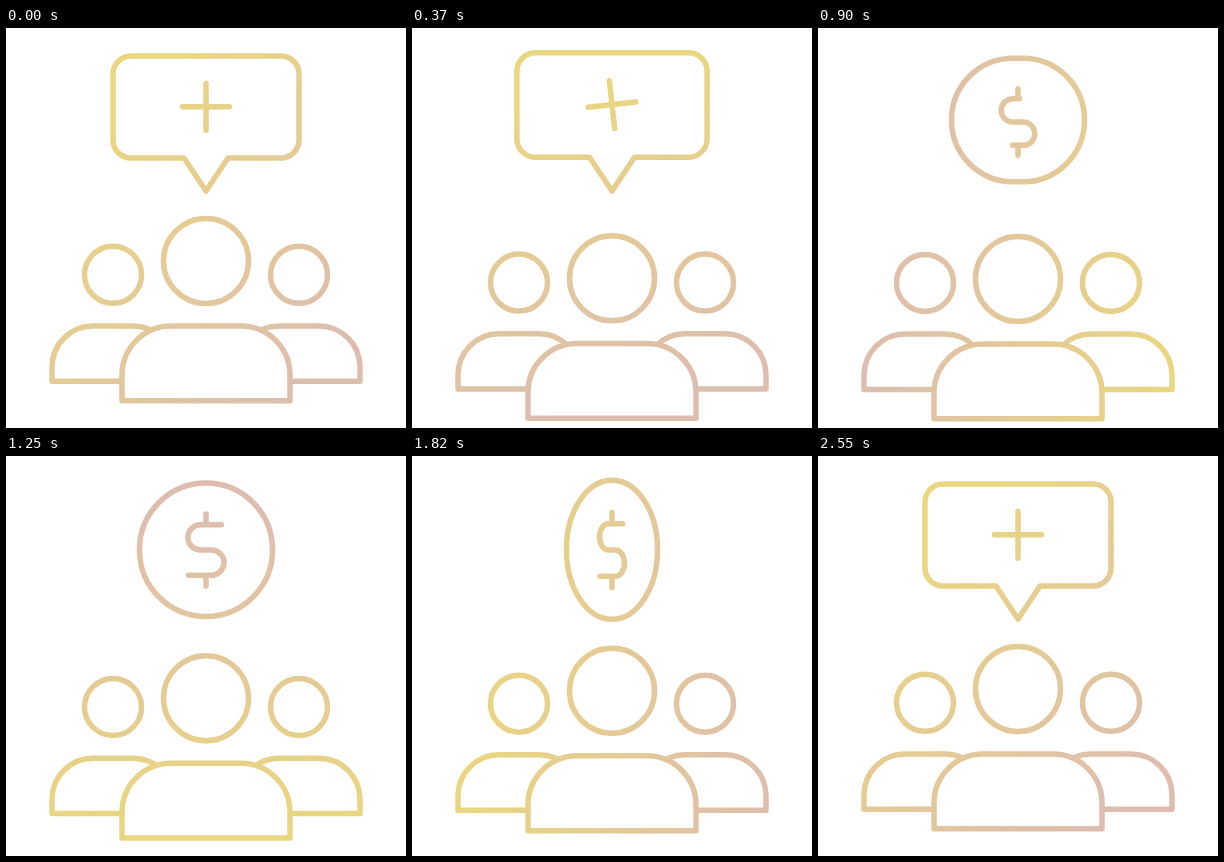
Write an HTML page with a canvas that moves like this. It is 400 px wide and 400 px high and loops after 2570 ms.

```html
<!DOCTYPE html>
<html lang="en">
<head>
<meta charset="utf-8">
<style>
html, body { margin: 0; width: 100%; height: 100%; overflow: hidden; background: #fff; }
canvas { display: block; width: 400px; height: 400px; }
</style>
</head>
<body>
<canvas id="stage"></canvas>
<script>
const LOOP = 2570, FLIP = 1960, CX = 200;
const GOLD = '#e9d680', PINK = '#ddbdb0';
const canvas = document.getElementById('stage');
const ctx = canvas.getContext('2d');
const dpr = window.devicePixelRatio || 1;
canvas.width = canvas.height = 400 * dpr;

const clamp = x => Math.min(1, Math.max(0, x));
const mix = (a, b, k) => a + (b - a) * k;
const span = (t, a, b) => clamp((t - a) / (b - a));
const smooth = x => x * x * (3 - 2 * x);

// Ease with control points (x1, 0) and (x2, 1), solved by bisection.
const bezier = (x1, x2) => x => {
  let lo = 0, hi = 1;
  for (let i = 0; i < 24; i++) {
    const u = (lo + hi) / 2, v = 1 - u;
    if (3 * u * v * v * x1 + 3 * u * u * v * x2 + u * u * u < x) lo = u; else hi = u;
  }
  return smooth(lo);
};
const settle = bezier(0.3, 0.2);
const turn = bezier(0.25, 0.5);
const windUp = t => span(t, 0, 600) ** 2.5;

// Half width, top, bottom, corner radius, tail size
const BUBBLE = [93, 28, 130, 18, 1];
const SWOLLEN = [100, 17.5, 127.5, 19.5, 1.08];
const SQUIRCLE = [66.5, 30.3, 153.7, 61.5, 0];
const COIN = [66.5, 27, 160.5, 66.5, 0];
const blend = (a, b, k) => a.map((v, i) => mix(v, b[i], k));

function signShape(t) {
  if (t >= FLIP) return BUBBLE;
  if (t < 600) return blend(BUBBLE, SWOLLEN, windUp(t));
  if (t < 900) return blend(SWOLLEN, SQUIRCLE, smooth(span(t, 600, 900)));
  return blend(SQUIRCLE, COIN, smooth(span(t, 900, 1100)));
}

function gradient(t) {
  const a = (-45 + 360 * turn(span(t, 40, 2530))) * Math.PI / 180;
  const x = 218, y = 210, dx = 155 * Math.sin(a), dy = -155 * Math.cos(a);
  const g = ctx.createLinearGradient(x + dx, y + dy, x - dx, y - dy);
  g.addColorStop(0, GOLD);
  g.addColorStop(1, PINK);
  return g;
}

// Builds a path under a transform, then strokes it with an even line width.
function draw(build, { x = 0, y = 0, sx = 1, sy = 1, rotate = 0, fill = false } = {}) {
  ctx.save();
  ctx.translate(x, y);
  ctx.scale(sx, sy);
  ctx.rotate(rotate);
  ctx.beginPath();
  build();
  ctx.restore();
  if (fill) ctx.fill();
  ctx.stroke();
}

function person(x, headY, headR, halfW, top, bottom, r, dy) {
  draw(() => {
    ctx.moveTo(-halfW, bottom);
    ctx.arcTo(-halfW, top, 0, top, r);
    ctx.arcTo(halfW, top, halfW, bottom, r);
    ctx.lineTo(halfW, bottom);
    ctx.closePath();
  }, { x, y: dy, fill: true });
  draw(() => ctx.arc(0, headY, headR, 0, 7), { x, y: dy });
}

function signPath([w, top, bottom, r, tail]) {
  const mid = (top + bottom) / 2;
  ctx.moveTo(0, top);
  ctx.arcTo(w, top, w, mid, r);
  ctx.arcTo(w, bottom, 0, bottom, r);
  if (tail > 0.01) {
    ctx.lineTo(22 * tail, bottom);
    ctx.lineTo(0, bottom + 33 * tail);
    ctx.lineTo(-22 * tail, bottom);
  }
  ctx.arcTo(-w, bottom, -w, mid, r);
  ctx.arcTo(-w, top, 0, top, r);
  ctx.closePath();
}

function plusPath() {
  ctx.moveTo(0, -23.5); ctx.lineTo(0, 23.5);
  ctx.moveTo(-23.5, 0); ctx.lineTo(23.5, 0);
}

function dollarPath(open) {
  const r = 12.6, end = mix(-6, 15.5, open ** 1.5), start = mix(6, -17.5, open);
  ctx.moveTo(end, -2 * r);
  ctx.lineTo(-5.5, -2 * r);
  ctx.arc(-5.5, -r, r, -Math.PI / 2, Math.PI / 2, true);
  ctx.lineTo(5.5, 0);
  ctx.arc(5.5, r, r, -Math.PI / 2, Math.PI / 2);
  ctx.lineTo(start, 2 * r);
  ctx.moveTo(0, -36); ctx.lineTo(0, -2 * r);
  ctx.moveTo(0, 36); ctx.lineTo(0, 2 * r);
}

function sign(t) {
  const flip = t < FLIP ? 1 - span(t, 1625, FLIP) ** 2 : 1 - (1 - span(t, FLIP, 2540)) ** 2;
  const pop = t < FLIP
    ? 1 + 0.09 * smooth(span(t, 1250, 1500)) - 0.07 * smooth(span(t, 1500, 2000)) : 1;
  const cy = 94;
  const shape = signShape(t);
  draw(() => signPath(shape), { x: CX, y: cy * (1 - pop), sx: flip * pop, sy: pop });

  const fade = t < FLIP ? span(t, 600, 720) : 0;
  if (fade < 1) {
    const wind = t < FLIP ? windUp(t) : 0;
    const size = (1 + 0.08 * wind) * (1 - fade);
    draw(plusPath, {
      x: CX, y: mix(78.7, 72, wind) + 22 * fade, sx: flip * size, sy: size,
      rotate: -(21 * wind + 40 * fade) * Math.PI / 180
    });
  }
  if (t > 680 && t < FLIP) {
    const grow = 1 - (1 - span(t, 680, 1060)) ** 3;
    const open = smooth(span(t, 750, 1050));
    draw(() => dollarPath(open), { x: CX, y: cy, sx: grow * flip * pop, sy: grow * pop });
  }
}

function render(t) {
  ctx.setTransform(dpr, 0, 0, dpr, 0, 0);
  ctx.fillStyle = '#fff';
  ctx.fillRect(0, 0, 400, 400);
  ctx.strokeStyle = gradient(t);
  ctx.lineWidth = 5.5;
  ctx.lineCap = ctx.lineJoin = 'round';

  const dip = t < 640 ? settle(span(t, 0, 640)) : 1 - settle(span(t, 640, 2500));
  for (const x of [107, 293]) person(x, 246.8, 28.5, 61, 298, 353.3, 41, 9 * dip);
  person(CX, 232.9, 42.5, 84, 298, 372.8, 49, 20 * dip);
  sign(t);
}

function tick() {
  render(performance.now() % LOOP);
  requestAnimationFrame(tick);
}
tick();
</script>
</body>
</html>
```
